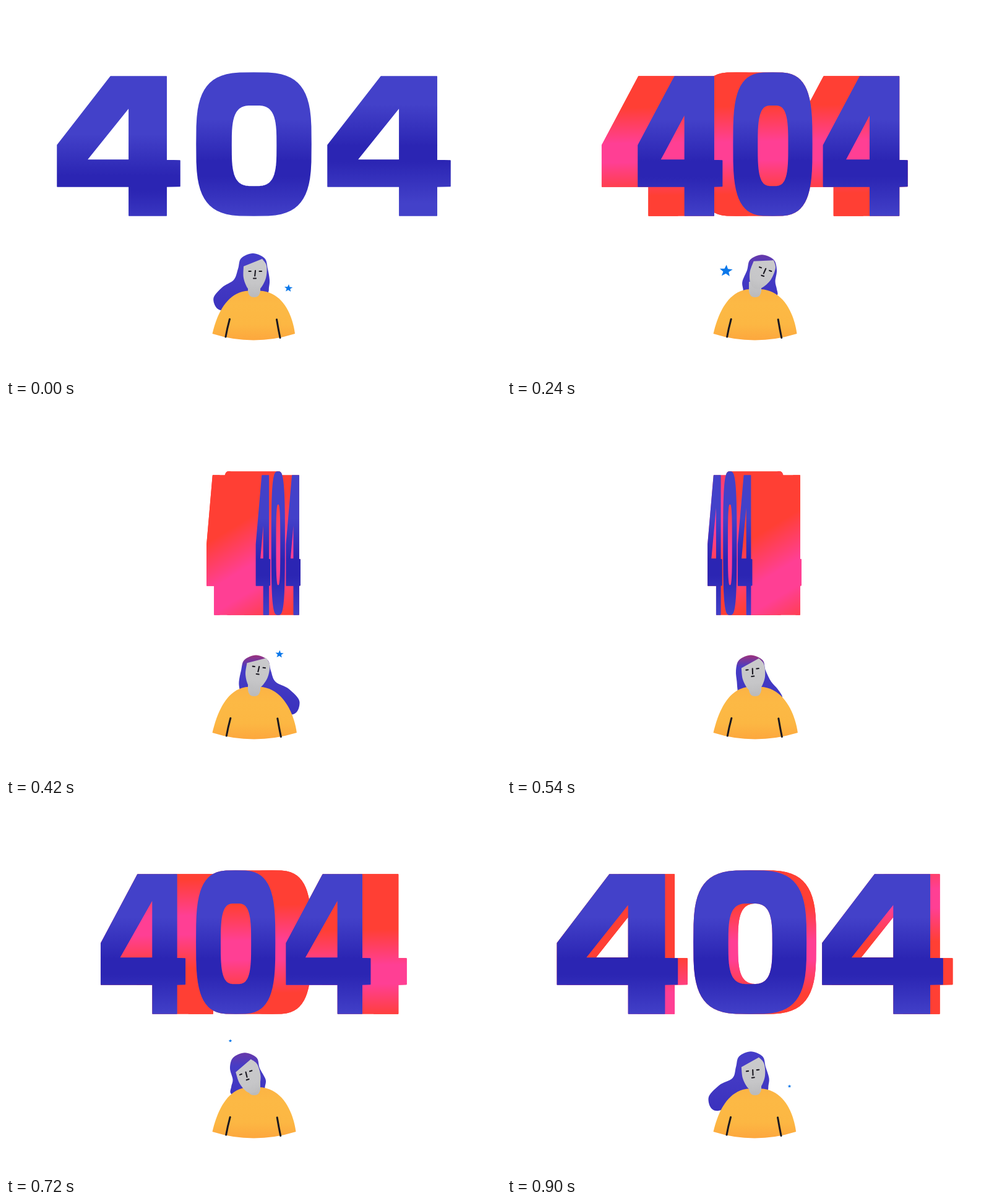
An HTML page that plays this animation: 800 px wide and 600 px high, repeating every 0.96 s.

```html
<!DOCTYPE html>
<html lang="en">
<head>
<meta charset="utf-8">
<title>404</title>
<style>
  html, body { margin: 0; width: 100%; height: 100%; overflow: hidden; background: #fff; }
  svg { display: block; width: 100vw; height: 100vh; }
</style>
</head>
<body>
<svg id="stage" viewBox="0 0 800 600"></svg>
<script>
const STEP = 60, COUNT = 16, DEPTH = 80;
const BLUE = '#4341c9', NAVY = '#2b25b3', RED = '#ff3f34', PINK = '#ff3f94';

const clamp = (v, lo, hi) => Math.max(lo, Math.min(hi, v));
const mix = (a, b, u) => a + (b - a) * u;
const at = ([x, y]) => x.toFixed(2) + ' ' + y.toFixed(2);
const poly = pts => 'M' + pts.map(at).join('L') + 'Z';

// Smooth segments through the points, without the leading move
function curve(pts, closed) {
  const n = pts.length;
  const get = i => closed ? pts[(i + n) % n] : pts[clamp(i, 0, n - 1)];
  let d = '';
  for (let i = 0; i < (closed ? n : n - 1); i++) {
    const [a, b, c, e] = [get(i - 1), get(i), get(i + 1), get(i + 2)];
    const c1 = [b[0] + (c[0] - a[0]) / 6, b[1] + (c[1] - a[1]) / 6];
    const c2 = [c[0] - (e[0] - b[0]) / 6, c[1] - (e[1] - b[1]) / 6];
    d += `C${at(c1)} ${at(c2)} ${at(c)}`;
  }
  return d;
}

const stage = document.getElementById('stage');
function set(el, attrs) {
  for (const key in attrs) el.setAttribute(key, attrs[key]);
}
function add(tag, attrs = {}, parent = stage) {
  const el = document.createElementNS('http://www.w3.org/2000/svg', tag);
  set(el, attrs);
  parent.append(el);
  return el;
}

const defs = add('defs');
const down = (y1, y2) => ({ x1: 0, x2: 0, y1, y2 });
function gradient(id, stops, line) {
  const el = add('linearGradient', { id, gradientUnits: 'userSpaceOnUse', ...line }, defs);
  stops.forEach(([offset, color]) => add('stop', { offset, 'stop-color': color }, el));
  return el;
}
const paint = id => ({
  fill: `url(#${id})`, stroke: `url(#${id})`, 'stroke-width': 1.5,
  'stroke-linejoin': 'round', 'fill-rule': 'evenodd'
});

// ---- Turning block of digits ----

// v: view from the side, 1 (left flank) to -1 (right flank)
function four(l, r, v) {
  const X = u => mix(l, r, u);
  const stem = X(.89 + .015 * Math.abs(v)), foot = X(.585 - .04 * v);
  return [
    [[X(.435), 114], [stem, 114], [stem, 249.5], [r, 250], [r, 291.5], [stem, 292],
     [stem, 339], [foot, 339], [foot, 292], [l, 292], [l, 225]],
    [[foot, 164 + 14 * v], [foot, 249], [X(.24 + .03 * v), 249]]
  ];
}

function squircle(cx, cy, rx, ry) {
  const pow = u => Math.sign(u) * Math.abs(u) ** .6;
  return Array.from({ length: 64 }, (_, i) => {
    const a = i * Math.PI / 32;
    return [cx + rx * pow(Math.cos(a)), cy + ry * pow(Math.sin(a))];
  });
}

function zero(l, r) {
  const w = r - l;
  return [squircle((l + r) / 2, 223.5, w / 2, 115.5), squircle(l + w * .503, 226, w * .2, 66)];
}

// Area the outline covers while sliding sideways by dx
function sweep(loops, dx) {
  let d = '';
  for (const loop of loops) loop.forEach((p, i) => {
    let q = loop[(i + 1) % loop.length];
    if ((q[1] - p[1]) * dx > 0) [p, q] = [q, p];
    d += poly([p, q, [q[0] + dx, q[1]], [p[0] + dx, p[1]]]);
  });
  return d;
}

const glyphs = [
  { shape: four, l: 83, r: 281 }, { shape: zero, l: 308, r: 493 }, { shape: four, l: 520, r: 718 }
];
glyphs.forEach((g, i) => {
  g.sideFill = gradient('side' + i, [[.08, RED], [.42, PINK], [.6, PINK], [.92, RED]]);
  g.frontFill = gradient('front' + i, [[0, BLUE], [.42, NAVY], [.58, NAVY], [1, BLUE]]);
  g.back = add('path', paint('side' + i));
  g.side = add('path', { ...paint('side' + i), 'fill-rule': 'nonzero' });
});
glyphs.forEach((g, i) => g.front = add('path', paint('front' + i)));

function drawDigits(k) {
  const a = Math.PI * k / COUNT, leaving = k < COUNT / 2;
  // The block passes its narrow view a little flatter than a plain cosine
  const scale = Math.abs(Math.cos(a)) * (1 - .5 * Math.sin(a) ** 8);
  const v = Math.sqrt(1 - scale * scale) * (leaving ? 1 : -1);
  const dx = -DEPTH * v, tilt = 55 * v ** 12;
  const place = x => 400 - dx / 2 + (x - 400) * scale;

  glyphs.forEach((g, i) => {
    const loops = g.shape(place(g.l), place(g.r), v);
    set(g.front, { d: loops.map(poly).join('') });
    set(g.back, { d: dx ? loops.map(pts => poly(pts.map(([x, y]) => [x + dx, y]))).join('') : '' });
    set(g.side, { d: dx ? sweep(loops, dx) : '' });

    const pink = leaving ? 165 + 17 * k : 235 + (i - 1) * clamp(42 * (13 - k), -84, 84);
    const navy = 268 + (1 - i) * 24 * Math.max(0, Math.cos(a)) ** 12;
    set(g.sideFill, { x1: 385 - tilt, x2: 385 + tilt, y1: pink - 85, y2: pink + 85 });
    set(g.frontFill, down(navy - 85, navy + 75));
  });
}

// ---- Person ----

const hairFill = gradient('hair', [[0, BLUE], [.22, '#463cc6'], [1, '#3a31bd']], down(403, 500));
gradient('skin', [[0, '#cacacc'], [.6, '#c6c6c8'], [1, '#b9b9bb']], down(410, 472));
gradient('shirt', [[0, '#fcb344'], [.3, '#fcb945'], [.68, '#fcb743'], [1, '#fda63d']], down(456, 542));

const ink = { fill: 'none', stroke: '#1a1820', 'stroke-linecap': 'round' };
const hair = add('path', { fill: 'url(#hair)' });
const body = add('path', { fill: 'url(#shirt)' });
const arms = add('path', { ...ink, 'stroke-width': 3, d: 'M361.5 506.5Q357.5 521 355 535M437.5 507Q440 522 443 536.5' });
add('path', { fill: 'url(#skin)', d: 'M391 446H411V461Q410 471 401 471Q392 471 391 461Z' });
const head = add('g');
const brow = [384, 421], peak = [414, 409];
const cheeks = [peak, [421, 420], [420, 440], [411, 457], [401, 462], [391, 457], [384, 440], brow];
add('path', { fill: 'url(#skin)', d: `M${at(brow)}L${at(peak)}${curve(cheeks)}Z` }, head);
const marks = add('path', {
  ...ink, 'stroke-width': 2.1,
  d: 'M392.5 429h3.2M409.5 429h3.5M403 428l-.8 8.5M400 440.5h4'
}, head);

// One side of the hair from crown to tip; u swings it out
function strand(dir, u, top, root, y) {
  const tip = (x0, x1, y0, y1) => [root + dir * mix(x0, x1, u), y + mix(y0, y1, u)];
  return [
    [top + dir * 19, y + 8], [top + dir * 24, y + 25],
    tip(26, 33, 43, 43), tip(25, 55, 55, 55), tip(23, 72, 64, 76), tip(10, 57, 70, 96)
  ];
}

function drawPerson(k) {
  const a = 2 * Math.PI * k / COUNT, s = Math.sin(a), c = Math.cos(a);
  set(head, { transform: `translate(0 ${-5 * s}) rotate(${19 * s} 401 463)` });
  set(marks, { transform: `translate(${3.5 * s} ${2 * c - 2})` });

  // Hair trails the head by a quarter turn and a step
  const sway = -Math.cos(a + Math.PI / 8);
  const top = 399 + 13 * s, root = 400 + 6.5 * s, y = 402.3 - 2.3 * c;
  const side = dir => strand(dir, Math.max(0, dir * sway) ** 2, top, root, y);
  const pts = [[top, y], ...side(1), [400, 472], ...side(-1).reverse()];
  set(hair, { d: 'M' + at(pts[0]) + curve(pts, true) + 'Z' });
  const glow = .7 * Math.sin(a / 2) ** 3;
  const tint = [mix(67, 214, glow), mix(61, 44, glow), mix(201, 76, glow)].map(Math.round);
  set(hairFill.firstChild, { 'stop-color': `rgb(${tint})` });

  const rise = 458 + 2.5 * c, r = 468.5 - 1.5 * c;
  set(body, {
    d: `M333.5 530C340 502 355 ${rise + 2} 392 ${rise}H410C448 ${rise + 2} ${r - 4} 500 ${r} 530Q400 551 333.5 530Z`
  });
  set(arms, { transform: `translate(${.7 - .7 * c} 0)` });
}

// ---- Stars: each grows for three steps, beginning at step k ----

const STARS = [
  { k: 15, x: 456.5, y: 456.5 }, { k: 2, x: 354, y: 428.5 },
  { k: 6, x: 442, y: 403 }, { k: 12, x: 362.5, y: 383 }
];
const star = add('path', { fill: '#0b78ea' });

function drawStar(k) {
  const age = s => (k - s.k + COUNT) % COUNT;
  const s = STARS.find(s => age(s) < 3);
  const size = s ? 3 + 4 * age(s) : 0;
  set(star, {
    d: s ? poly(Array.from({ length: 10 }, (_, i) => {
      const a = i * Math.PI / 5 - 1.5, r = i % 2 ? size * .43 : size;
      return [s.x + r * Math.cos(a), s.y + r * .92 * Math.sin(a)];
    })) : ''
  });
}

let start, last = -1;
function draw(time) {
  const k = Math.floor(time / STEP) % COUNT;
  if (k === last) return;
  last = k;
  drawDigits(k);
  drawPerson(k);
  drawStar(k);
}
function tick(now) {
  start ??= now;
  draw(Math.max(0, now - start));
  requestAnimationFrame(tick);
}
draw(0);
requestAnimationFrame(tick);
</script>
</body>
</html>
```
